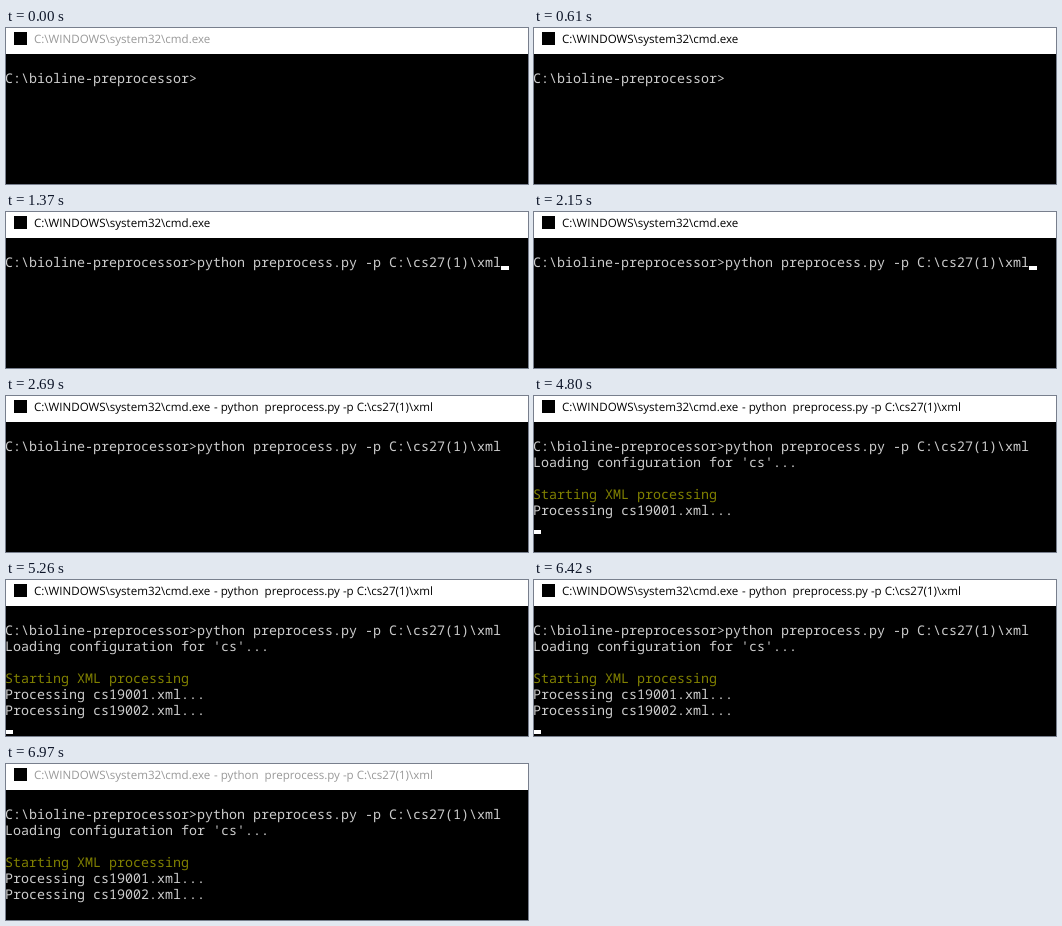
An HTML page for the animation above (7120 ms loop, 522x156 px).

```html
<!DOCTYPE html>
<html lang="en">
<head>
<meta charset="utf-8">
<title>Command prompt</title>
<style>
  html, body { margin: 0; width: 100%; height: 100%; overflow: hidden; background: #000; }
  svg { display: block; width: 522px; height: 156px; }
  text { white-space: pre; text-rendering: geometricPrecision; }

  .title { font: 11.55px "Open Sans", "Noto Sans", sans-serif; }
  .console { font: 500 13.3333px "Noto Sans Mono", "DejaVu Sans Mono", monospace; fill: #ccc; }
  .console .notice { fill: #808000; }

  .title, .args, .typed, .start, .second, .cursor {
    animation: 7120ms step-end infinite;
  }
  .title  { animation-name: focus; }
  .args   { animation-name: args; }
  .typed  { animation-name: typed; }
  .start  { animation-name: start; }
  .second { animation-name: second; }
  .cursor { animation-name: cursor; fill: #fff; }

  @keyframes focus {
    0%, 97.8932% { fill: #999; }
    8.5674% { fill: #000; }
    100% { fill: #999; }
  }
  @keyframes args   { 0% { opacity: 0; } 37.7808%, 100% { opacity: 1; } }
  @keyframes typed  { 0% { opacity: 0; } 19.2415%, 100% { opacity: 1; } }
  @keyframes start  { 0% { opacity: 0; } 39.8876%, 100% { opacity: 1; } }
  @keyframes second { 0% { opacity: 0; } 73.8764%, 100% { opacity: 1; } }

  /* Blinking cursor: after the prompt, after the command, then at each new line */
  @keyframes cursor {
    0%       { opacity: 0; transform: translate(191px, 54px); }
    16.0112% { opacity: 1; transform: translate(191px, 54px); }
    19.2415% { opacity: 1; transform: translate(495px, 54px); }
    23.7359% { opacity: 0; transform: translate(495px, 54px); }
    30.1966% { opacity: 1; transform: translate(495px, 54px); }
    36.6573% { opacity: 1; transform: translate(-1px, 70px); }
    37.7808% { opacity: 0; transform: translate(-1px, 70px); }
    53.2303% { opacity: 1; transform: translate(-1px, 134px); }
    60.9550% { opacity: 0; transform: translate(-1px, 134px); }
    67.4157% { opacity: 1; transform: translate(-1px, 134px); }
    73.8764% { opacity: 1; transform: translate(-1px, 150px); }
    82.4438% { opacity: 0; transform: translate(-1px, 150px); }
    90.1685% { opacity: 1; transform: translate(-1px, 150px); }
    97.8932%, 100% { opacity: 0; transform: translate(-1px, 150px); }
  }
</style>
</head>
<body>
<svg viewBox="0 0 522 156">
  <rect width="522" height="26" fill="#fff"/>
  <rect x="8" y="4" width="13" height="13" fill="#000"/>
  <g class="title">
    <text x="28" y="15">C:\WINDOWS\system32\cmd.exe</text>
    <text class="args" x="205" y="15"> - python  preprocess.py -p C:\cs27(1)\xml</text>
  </g>
  <g class="console">
    <text x="-1" y="55">C:\bioline-preprocessor&gt;</text>
    <text class="typed" x="191" y="55">python preprocess.py -p C:\cs27(1)\xml</text>
    <g class="start">
      <text x="-1" y="71">Loading configuration for 'cs'...</text>
      <text class="notice" x="-1" y="103">Starting XML processing</text>
      <text x="-1" y="119">Processing cs19001.xml...</text>
    </g>
    <text class="second" x="-1" y="135">Processing cs19002.xml...</text>
  </g>
  <rect class="cursor" width="8" height="4"/>
</svg>
</body>
</html>
```
